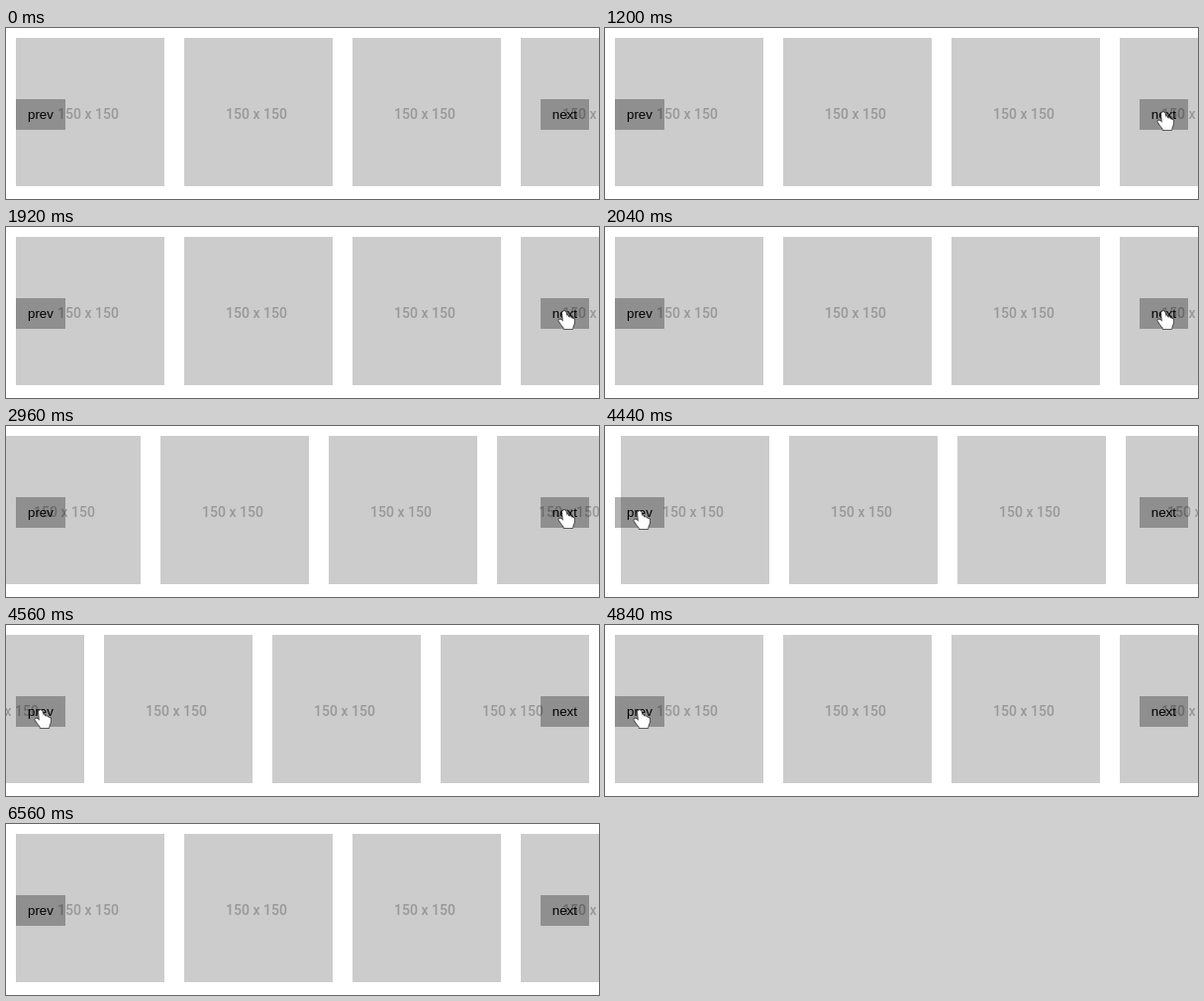
These frames come from a looping animation (599x173 px, 6.6 s). An HTML page with a canvas:

```html
<!DOCTYPE html>
<html lang="en">
<head>
<meta charset="utf-8">
<title>Slider</title>
<style>
html, body { margin: 0; width: 100%; height: 100%; overflow: hidden; background: #fff; }
#stage { position: relative; width: 599px; height: 173px; overflow: hidden; }
#strip { position: absolute; left: 0; top: 10px; }
.tile {
  position: absolute; top: 0; width: 150px; height: 150px;
  background: #ccc; color: #989898;
  font: 500 14px/154px Roboto, "Liberation Sans", sans-serif;
  text-align: center; text-indent: -4px; white-space: nowrap;
}
.btn {
  position: absolute; top: 72px; padding: 8px 12px;
  background: rgba(0, 0, 0, .3); color: #000;
  font: 13.333px/15px "Liberation Sans", Arial, sans-serif;
}
#prev { left: 10px; }
#next { right: 10px; }
#pointer { position: absolute; left: 0; top: 0; }
</style>
</head>
<body>
<div id="stage">
  <div id="strip"></div>
  <div class="btn" id="prev">prev</div>
  <div class="btn" id="next">next</div>
  <canvas id="pointer" width="599" height="173"></canvas>
</div>
<script>
const LOOP = 6600, TICK = 40, TILES = 5, PITCH = 170, END = 251;
const strip = document.getElementById('strip');
const ctx = document.getElementById('pointer').getContext('2d');

for (let i = 0; i < TILES; i++) {
  const tile = document.createElement('div');
  tile.className = 'tile';
  tile.textContent = '150 x 150';
  tile.style.left = 10 + i * PITCH + 'px';
  strip.append(tile);
}

// Each click: start time, scroll position before and after
const clicks = [
  [1550, 0, PITCH],
  [2905, PITCH, END],
  [4330, END, END - PITCH],
  [4665, END - PITCH, 0]
];

// Pointer tip: time, x, y
const path = [
  [480, 546, 139], [560, 556, 116], [640, 562, 100], [720, 565, 90], [800, 564, 85],
  [3440, 564, 85], [3480, 330, 106], [3520, 26, 92], [3560, 35, 86],
  [5280, 35, 86], [5360, 37, 95], [5440, 42, 116], [5520, 48, 145], [5600, 54, 178]
];

const hand = new Path2D(
  'M-2 1.8C-2-.4 1.6-.4 1.8 1.8L2.3 6.3C3-.0 3 5.6 5 6.6C6.3 6 7.2 6.4 7.6 7.6' +
  'C9 7.1 10.2 7.8 10.2 9.6C10.3 12.5 9.4 14.5 8.6 16L8.4 18H-.4L-.7 16.4' +
  'C-2.5 14.8-3.6 12.4-5.4 10.4C-6.3 8.8-4.3 7.7-3 9L-1.2 10.8Z');
const arrow = new Path2D('M0 0V15.5L3.6 12.2L6.3 18.2L8.9 17L6.3 11.2H11Z');

function scrollAt(t) {
  let pos = 0;
  for (const [start, from, to] of clicks) {
    if (t < start) break;
    const duration = Math.sqrt(Math.abs(to - from)) / 60 * 1000;
    const u = Math.min(1, (t - start) / duration);
    pos = from + (to - from) * (1 - Math.cos(Math.PI * u)) / 2;
  }
  return Math.round(pos);
}

function pointerAt(t) {
  const i = path.findIndex(p => p[0] > t);
  if (i < 1) return null;
  const [t0, x0, y0] = path[i - 1], [t1, x1, y1] = path[i];
  const u = (t - t0) / (t1 - t0);
  return [x0 + (x1 - x0) * u, y0 + (y1 - y0) * u];
}

function overButton(x, y) {
  return y >= 72 && y <= 103 && (x >= 10 && x <= 60 || x >= 540 && x <= 589);
}

function paint(shape, fill, stroke, width) {
  ctx.lineWidth = width;
  ctx.lineJoin = 'round';
  ctx.strokeStyle = stroke;
  ctx.fillStyle = fill;
  ctx.stroke(shape);
  ctx.fill(shape);
}

function drawPointer(t) {
  ctx.clearRect(0, 0, 599, 173);
  const at = pointerAt(t);
  if (!at) return;
  ctx.save();
  ctx.translate(...at);
  if (overButton(...at)) paint(hand, '#fff', '#333', 1.6);
  else paint(arrow, '#111', '#fff', 2);
  ctx.restore();
}

const begin = performance.now();
function frame() {
  const now = (performance.now() - begin) % LOOP;
  const t = Math.floor((now + .5) / TICK) * TICK;
  strip.style.transform = `translateX(${-scrollAt(t)}px)`;
  drawPointer(t);
  requestAnimationFrame(frame);
}
frame();
</script>
</body>
</html>
```
